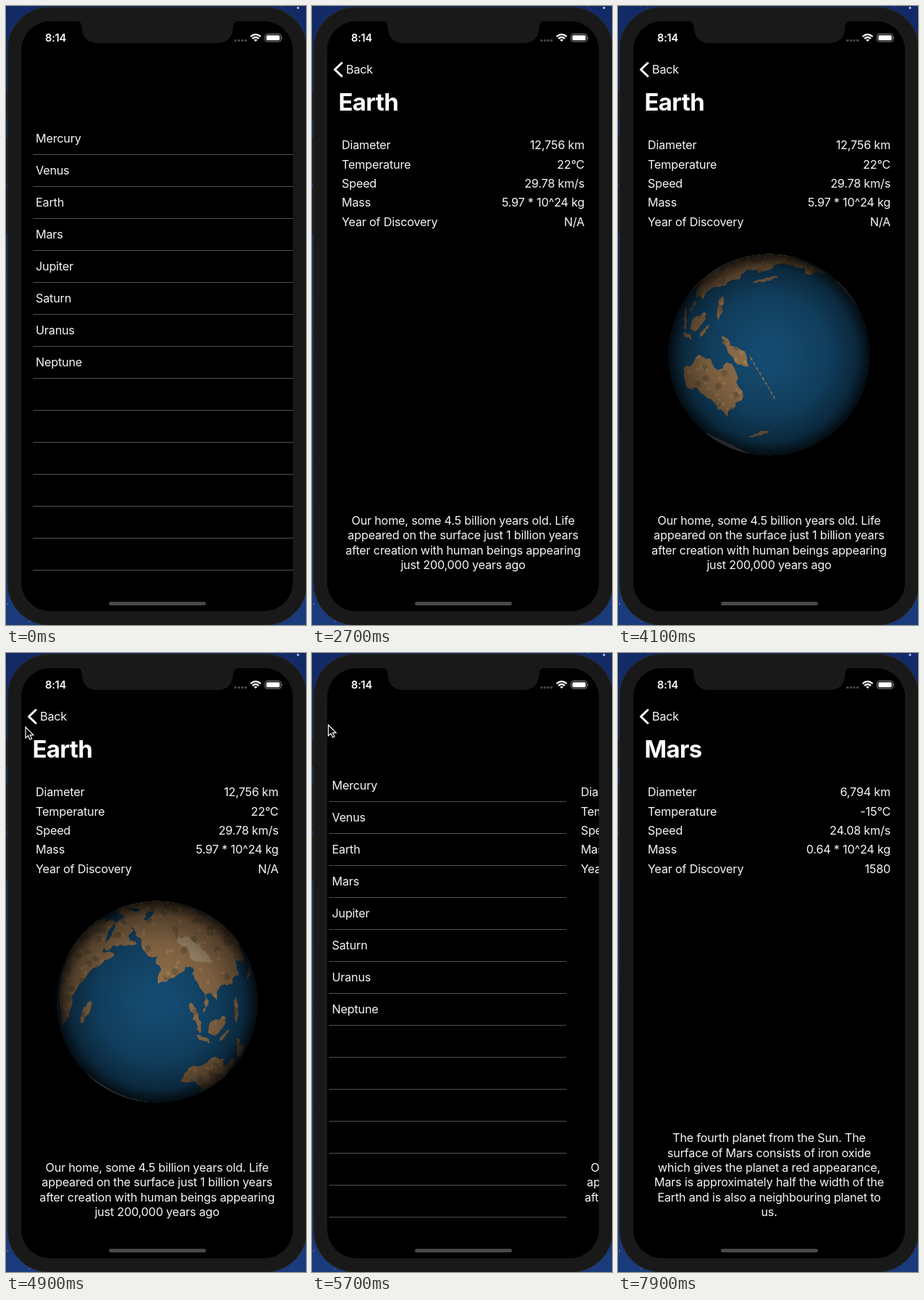
An HTML page that plays this animation: 414x852 px, repeating every 8 s.

```html
<!DOCTYPE html>
<html lang="en">
<head>
<meta charset="utf-8">
<title>Planets</title>
<style>
  html, body { margin: 0; width: 100%; height: 100%; overflow: hidden; background: #14306e; }
  svg { display: block; }
  text { font: 16.2px Inter, Roboto, sans-serif; letter-spacing: -.2px; fill: #f6f6f6; }
  .end { text-anchor: end; }
  .mid { text-anchor: middle; }
  .title { font-size: 33px; font-weight: 700; letter-spacing: -.7px; fill: #fff; }
  .clock { font-size: 14.6px; font-weight: 600; fill: #fff; }
  .spots { fill: none; stroke-linecap: round; }
</style>
</head>
<body>
<svg width="414" height="852" viewBox="0 0 414 852">
  <defs>
    <linearGradient id="sky" x2="0" y2="1">
      <stop stop-color="#122a66"/><stop offset="1" stop-color="#1a3b7c"/>
    </linearGradient>
    <radialGradient id="shade">
      <stop offset=".15" stop-opacity="0"/><stop offset=".6" stop-opacity=".18"/>
      <stop offset=".86" stop-opacity=".45"/><stop offset="1" stop-opacity=".85"/>
    </radialGradient>
    <clipPath id="screen"><rect x="21" y="21" width="375" height="812" rx="40"/></clipPath>
    <clipPath id="disc"><circle cx="208.5" cy="480" r="138.5"/></clipPath>
    <clipPath id="ground"><path id="groundPath"/></clipPath>
  </defs>

  <rect width="414" height="852" fill="url(#sky)"/>
  <g id="stars" fill="#c9d6f5"></g>
  <g fill="#1c1c1c" stroke="#08080a">
    <rect x="-3" y="121" width="8" height="33"/>
    <rect x="-3" y="183" width="8" height="60"/>
    <rect x="-3" y="252" width="8" height="60"/>
  </g>
  <rect x="2" y="1.5" width="413.5" height="851" rx="58" fill="#191919" stroke="#2c2b2b"/>

  <g clip-path="url(#screen)">
    <rect x="21" y="21" width="375" height="812"/>
    <g id="list"></g>
    <g id="detail">
      <rect x="21" y="21" width="375" height="812"/>
      <g id="info"></g>
      <g id="globe" clip-path="url(#disc)">
        <circle cx="208.5" cy="480" r="139" fill="#144a6f"/>
        <path id="land" fill="#94714c"/>
        <g clip-path="url(#ground)">
          <path class="spots" id="dark" stroke="#504a30" stroke-width="9" opacity=".4"/>
          <path class="spots" id="light" stroke="#c39c70" stroke-width="5" opacity=".35"/>
          <path id="plateau" fill="#b8a78c" opacity=".6"/>
        </g>
        <path id="seas" fill="#144a6f"/>
        <path id="ice" fill="#c4bfb8"/>
        <circle cx="208.5" cy="480" r="139" fill="url(#shade)"/>
      </g>
    </g>
    <g id="nav">
      <path d="M41 78.5L31.500 87.5L41 96.5" fill="none" stroke="#fff" stroke-width="3" stroke-linecap="round" stroke-linejoin="round"/>
      <text x="47" y="93.300">Back</text>
    </g>
    <text id="title" class="title" x="36.500" y="144.300"></text>
  </g>

  <path d="M97 20.5Q104 21 104.5 28Q105 51 127 51H291Q313 51 313.5 28Q314 21 321 20.5Z" fill="#191919"/>
  <text class="clock" x="54" y="49.3">8:14</text>
  <path d="M316.8 47.5h14" stroke="#464646" stroke-width="3.6" stroke-linecap="round" stroke-dasharray="0 4.6"/>
  <g fill="none" stroke="#fff" stroke-width="2.2">
    <path d="M337.5 42.3Q344.5 36 351.5 42.3M340 45Q344.5 41 349 45"/>
    <path d="M342 46.5Q344.5 44.8 347 46.5L344.5 49Z" fill="#fff" stroke="none"/>
  </g>
  <rect x="357.5" y="38.5" width="22" height="10.5" rx="3" fill="none" stroke="#8b8b8b"/>
  <rect x="359.3" y="40.3" width="18.4" height="6.9" rx="1.5" fill="#fff"/>
  <path d="M380.7 42Q382.5 43.8 380.7 45.6Z" fill="#8b8b8b"/>
  <rect x="142" y="820" width="134" height="5" rx="2.5" fill="#484848"/>
  <path id="cursor" d="M0 0V15L3.6 11.8L6 17.2L8.6 16L6.2 10.9H10.8Z" fill="#000" stroke="#fff" stroke-width="1.2"/>
</svg>

<script>
const $ = id => document.getElementById(id);
const label = (x, y, str, cls = '') => `<text x="${x}" y="${y}" class="${cls}">${str}</text>`;
const times = (n, fn) => Array.from({ length: n }, (_, i) => fn(i));

let seed = 7;
const rand = () => (seed = seed * 16807 % 2147483647) / 2147483647;

// Static parts
const names = ['Mercury', 'Venus', 'Earth', 'Mars', 'Jupiter', 'Saturn', 'Uranus', 'Neptune'];
$('list').innerHTML = names.map((n, i) => label(41, 187.7 + 44 * i, n)).join('') +
  times(14, i => `<rect x="37" y="${204 + 44 * i}" width="359" height="1" fill="#515151"/>`).join('');

$('stars').innerHTML = times(700, () =>
  `<circle cx="${rand() * 414}" cy="${rand() * 852}" r="${.3 + rand() * .6}" opacity="${rand()}"/>`).join('') +
  '<circle cx="403" cy="2.5" r="1.5"/>';

const fields = ['Diameter', 'Temperature', 'Speed', 'Mass', 'Year of Discovery'];
const planets = {
  Earth: {
    facts: ['12,756 km', '22°C', '29.78 km/s', '5.97 * 10^24 kg', 'N/A'],
    bio: ['Our home, some 4.5 billion years old. Life', 'appeared on the surface just 1 billion years',
      'after creation with human beings appearing', 'just 200,000 years ago']
  },
  Mars: {
    facts: ['6,794 km', '-15°C', '24.08 km/s', '0.64 * 10^24 kg', '1580'],
    bio: ['The fourth planet from the Sun. The', 'surface of Mars consists of iron oxide',
      'which gives the planet a red appearance,', 'Mars is approximately half the width of the',
      'Earth and is also a neighbouring planet to', 'us.']
  }
};

let shown;
function showPlanet(name) {
  if (name === shown) return;
  shown = name;
  const { facts, bio } = planets[name];
  $('title').textContent = name;
  $('info').innerHTML =
    fields.map((f, i) => label(41, 197.2 + 26.4 * i, f) + label(376, 197.2 + 26.4 * i, facts[i], 'end')).join('') +
    bio.map((b, i) => label(208.5, 774.8 - 20.3 * (bio.length - 1 - i), b, 'mid')).join('');
}

// Split every edge at a randomly displaced midpoint, giving ragged coasts
function roughen(pts, depth) {
  if (!depth) return pts;
  const finer = pts.flatMap(([x, y], i) => {
    const [x2, y2] = pts[(i + 1) % pts.length];
    const dx = x2 - x, dy = y2 - y, len = Math.hypot(dx, dy);
    const push = (rand() - .5) * .5 * Math.min(1, 12 / len);
    return [[x, y], [x + dx / 2 - dy * push, y + dy / 2 + dx * push]];
  });
  return roughen(finer, depth - 1);
}

const RAD = Math.PI / 180;
const coast = (...keys) => roughen(times(keys.length / 2, i => [keys[2 * i], keys[2 * i + 1]]), 3);
const island = (lon, lat, length, width, angle) => {
  const c = Math.cos(angle * RAD), s = Math.sin(angle * RAD);
  return roughen(times(8, i => {
    const u = length * Math.cos(i * Math.PI / 4), v = width * Math.sin(i * Math.PI / 4);
    return [lon + u * c - v * s, lat + u * s + v * c];
  }), 2);
};

// Key points are longitude, latitude pairs
const eurasia = coast(0,42, 10,57, 26,71, 105,77, 185,66, 157,52, 155,59, 137,54, 129,38, 120,38, 122,30,
  109,20, 109,11, 100,13, 104,2, 98,14, 91,22, 87,21, 78,8, 72,20, 57,26, 49,30, 52,24, 59,22, 45,13,
  35,29, 36,36, 24,38);
const africa = coast(-6,35, 20,31, 32,31, 43,12, 51,12, 40,-5, 33,-26, 20,-35, 9,4, -8,4, -17,15);
const australia = coast(114,-22, 130,-13, 137,-16, 142,-11, 153,-26, 148,-39, 136,-33, 115,-34);
const america = coast(-165,62, -95,70, -58,50, -82,28, -97,20, -124,42);
const madagascar = island(47, -19, 7, 2.2, 72);
const newGuinea = island(141, -5, 10, 2.5, -22);
const borneo = island(114, 1, 6, 3.5, 55);
const sumatra = island(101, 0, 8, 1.6, -45);
const java = island(110, -7.5, 5, .9, -8);
const sulawesi = island(121, -2, 4, 1.2, 70);
const philippines = island(123, 12, 7, 1.3, -65);
const japan = island(137, 36, 8, 1.3, 42);
const newZealand = island(172, -42, 7, 1.3, 50);
const melanesia = times(9, i => island(150 + 2.2 * i, -5 - 1.6 * i, 1.1, .35, -40));
const lands = [eurasia, africa, australia, america, madagascar, newGuinea, borneo, sumatra, java, sulawesi,
  philippines, japan, newZealand, ...melanesia];
const caspian = island(51, 42, 5, 2, -70), blackSea = island(35, 43, 6, 2, 0);
const tibet = island(88, 32, 12, 4, -15);
const antarctica = times(48, i => [i * 7.5, -67 + 3 * Math.sin(i * .4)]);

const scatter = n => times(n, () => [rand() * 360, Math.asin(rand() * 2 - 1) / RAD]);
const darkSpots = scatter(500), lightSpots = scatter(700);

// Perspective view of a sphere with a tilted axis
const DIST = 5, TILT = 23.4 * RAD;
const sinT = Math.sin(TILT), cosT = Math.cos(TILT);
function project([lon, lat], center) {
  const u = (lon - center) * RAD, c = Math.cos(lat * RAD);
  const east = c * Math.sin(u), north = Math.sin(lat * RAD), z = c * Math.cos(u);
  const x = cosT * east + sinT * north, y = cosT * north - sinT * east;
  const front = z > 1 / DIST;
  // Hidden points slide out to the limb
  const k = 139 * (front ? Math.sqrt(DIST * DIST - 1) / (DIST - z) : 1 / Math.hypot(x, y));
  return { front, at: (208.5 + k * x).toFixed(1) + ' ' + (480 - k * y).toFixed(1) };
}

function outline(shape, center) {
  const pts = shape.map(p => project(p, center));
  return pts.some(p => p.front) ? 'M' + pts.map(p => p.at).join('L') + 'Z' : '';
}

const dots = (spots, center) => spots.map(s => project(s, center))
  .filter(p => p.front).map(p => `M${p.at}h.01`).join('');

function drawGlobe(center) {
  const set = (id, d) => $(id).setAttribute('d', d);
  const ground = lands.map(l => outline(l, center)).join('');
  set('land', ground);
  set('groundPath', ground);
  set('dark', dots(darkSpots, center));
  set('light', dots(lightSpots, center));
  set('plateau', outline(tibet, center));
  set('seas', outline(caspian, center) + outline(blackSea, center));
  set('ice', outline(antarctica, center));
}

// Timeline
const LOOP = 8000, WIDTH = 375, PUSH = 1000, GLOBE = 3300, POP = 5435, PUSH2 = 7000;
const settle = ms => { const x = Math.max(0, ms) * .01375; return 1 - (1 + x) * Math.exp(-x); };
const move = (id, x, y = 0) => $(id).setAttribute('transform', `translate(${x.toFixed(2)} ${y})`);
const show = (id, on) => $(id).style.display = on ? '' : 'none';

function draw(t) {
  const open = t < POP ? settle(t - PUSH) : t < PUSH2 ? 1 - settle(t - POP) : settle(t - PUSH2);
  const off = WIDTH * (1 - open);
  showPlanet(t < PUSH2 ? 'Earth' : 'Mars');
  move('detail', off);
  move('list', -.3 * (WIDTH - off));
  move('title', .37 * off);
  move('nav', .05 * off);
  $('title').style.opacity = $('nav').style.opacity = Math.max(0, 1 - 1.6 * (1 - open));

  const spinning = t >= GLOBE && t < PUSH2;
  show('globe', spinning);
  if (spinning) drawGlobe(157 - .095 * (t - 4100));

  show('cursor', t >= 4600 && t < 6300);
  if (t < 5400) move('cursor', 27, 102); else move('cursor', 22.5, 99);
}

const start = performance.now();
function tick() {
  draw((performance.now() - start) % LOOP);
  requestAnimationFrame(tick);
}
tick();
</script>
</body>
</html>
```
